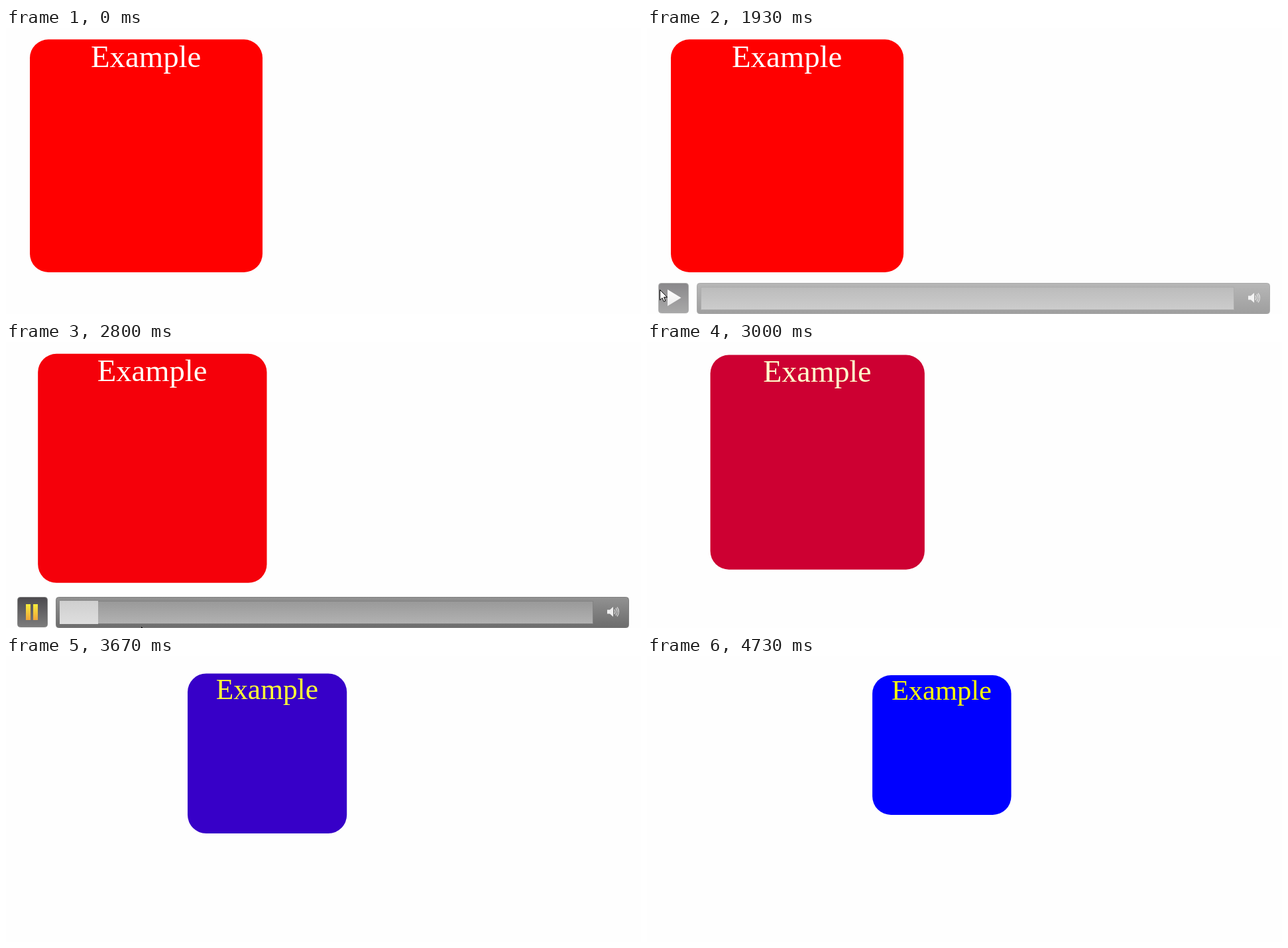
Recreate the animation shown at these times as an HTML page. Size 958 px wide and 432 px high, loop 6270 ms.

```html
<!DOCTYPE html>
<html lang="en">
<head>
<meta charset="utf-8">
<title>Card transition</title>
<style>
html, body { margin: 0; width: 100%; height: 100%; overflow: hidden; background: #fefefe; }
svg { display: block; width: 958px; height: 432px; }
text { font-family: "Liberation Serif", "Times New Roman", serif; text-anchor: middle; }
</style>
</head>
<body>
<svg viewBox="0 0 958 432">
  <defs>
    <linearGradient id="buttonFill" x2="0" y2="1">
      <stop stop-color="#4c4a4e"/><stop offset="1" stop-color="#7c7c7c"/>
    </linearGradient>
    <linearGradient id="barFill" x2="0" y2="1">
      <stop stop-color="#929292"/><stop offset="1" stop-color="#6c6c6c"/>
    </linearGradient>
    <linearGradient id="trackFill" x2="0" y2="1">
      <stop stop-color="#999"/><stop offset="1" stop-color="#b2b2b2"/>
    </linearGradient>
    <linearGradient id="doneFill" x2="0" y2="1">
      <stop stop-color="#cfcfcf"/><stop offset="1" stop-color="#dedede"/>
    </linearGradient>
    <linearGradient id="playFill" x2="0" y2="1">
      <stop stop-color="#fff"/><stop offset="1" stop-color="#e4e4e4"/>
    </linearGradient>
    <linearGradient id="pauseFill" x2="0" y2="1">
      <stop stop-color="#f6ec3c"/><stop offset="1" stop-color="#efa53a"/>
    </linearGradient>
  </defs>

  <rect width="958" height="432" fill="#fefefe"/>
  <rect id="card" rx="28"/>
  <text id="label">Example</text>

  <g id="controls">
    <rect x="17.5" y="385.5" width="45" height="45" rx="4" fill="url(#buttonFill)" stroke="#858585"/>
    <path id="play" d="M31 395L51.5 407.5L31 420Z" fill="url(#playFill)"/>
    <path id="pause" d="M30 396h7v24h-7zM41 396h7v24h-7z" fill="url(#pauseFill)"/>
    <rect x="75.5" y="385.5" width="864" height="46" rx="4" fill="url(#barFill)" stroke="#808080"/>
    <rect x="81.5" y="391.5" width="804" height="34" fill="url(#trackFill)" stroke="#828282"/>
    <rect id="done" x="81" y="391" height="35" fill="url(#doneFill)"/>
    <path d="M907 404.5h4l5-4.5v15l-5-4.5h-4z" fill="#f0f0f0"/>
    <path d="M918 404q2 3.5 0 7M920 402q4 5.500 0 11M922 400.500q5 7 0 14" fill="none" stroke="#d4d4d4" stroke-width="1.3"/>
  </g>

  <path id="cursor" d="M.5.5V16L4 12.700L6.400 18.200L8.800 17.200L6.500 11.700H11.500Z" fill="#fff" stroke="#000"/>
</svg>
<script>
const LOOP = 6270, FPS = 15;
const MOVE_START = 2683, MOVE_TIME = 2045;
const PLAY_AT = 2330, PROGRESS_AT = 2600;

// Keyframes: time followed by values
const fadeKeys = [[1867, 0], [1933, .65], [2000, 1], [2800, 1], [3000, 0]];
const cursorKeys = [
  [667, 98, 445], [733, 87, 428], [867, 68, 403], [1000, 52, 384], [1130, 43, 374],
  [1867, 43, 374], [1933, 19, 395], [2000, 14, 401], [2200, 24, 410],
  [2333, 28, 412], [2600, 28, 412], [2667, 60, 416], [2733, 125, 424],
  [2800, 204, 430], [2867, 280, 450]
];

const el = id => document.getElementById(id);
const set = (id, attrs) => {
  for (const name in attrs) el(id).setAttribute(name, attrs[name]);
};
const mix = (a, b, f) => a + (b - a) * f;
const show = on => on ? "visible" : "hidden";

function sample(keys, t) {
  if (t <= keys[0][0]) return keys[0].slice(1);
  for (let i = 1; i < keys.length; i++) {
    const a = keys[i - 1], b = keys[i];
    if (t <= b[0]) {
      const f = (t - a[0]) / (b[0] - a[0]);
      return a.slice(1).map((v, j) => mix(v, b[j + 1], f));
    }
  }
  return keys[keys.length - 1].slice(1);
}

// CSS "ease": cubic-bezier(.25, .1, .25, 1)
function ease(x) {
  if (x <= 0) return 0;
  if (x >= 1) return 1;
  let lo = 0, hi = 1, s;
  for (let i = 0; i < 24; i++) {
    s = (lo + hi) / 2;
    if (.75 * s * (1 - s) + s ** 3 < x) lo = s; else hi = s;
  }
  return .3 * s * (1 - s) ** 2 + 3 * s * s * (1 - s) + s ** 3;
}

function drawCard(f) {
  const x = mix(36, 340, f), y = mix(17.3, 29, f);
  const width = mix(351, 209.5, f), height = mix(351.7, 211, f);
  const red = Math.round(255 * (1 - f));
  set("card", { x, y, width, height, fill: `rgb(${red},0,${255 - red})` });
  set("label", {
    x: x + width / 2 - .3,
    y: mix(59, 66.3, f),
    "font-size": mix(46.8, 42.5, f),
    fill: `rgb(255,255,${red})`
  });
}

function draw(time) {
  const t = Math.floor((time + 4) * FPS / 1000) * 1000 / FPS;
  drawCard(ease((t - MOVE_START) / MOVE_TIME));

  const playing = t >= PLAY_AT;
  set("controls", { opacity: sample(fadeKeys, t)[0] });
  set("play", { visibility: show(!playing) });
  set("pause", { visibility: show(playing) });
  set("done", { width: t >= PROGRESS_AT ? 58 : 0 });

  const [x, y] = sample(cursorKeys, t);
  set("cursor", { transform: `translate(${Math.round(x)} ${Math.round(y)})` });
}

const start = performance.now();
function tick() {
  draw((performance.now() - start) % LOOP);
  requestAnimationFrame(tick);
}
tick();
</script>
</body>
</html>
```
